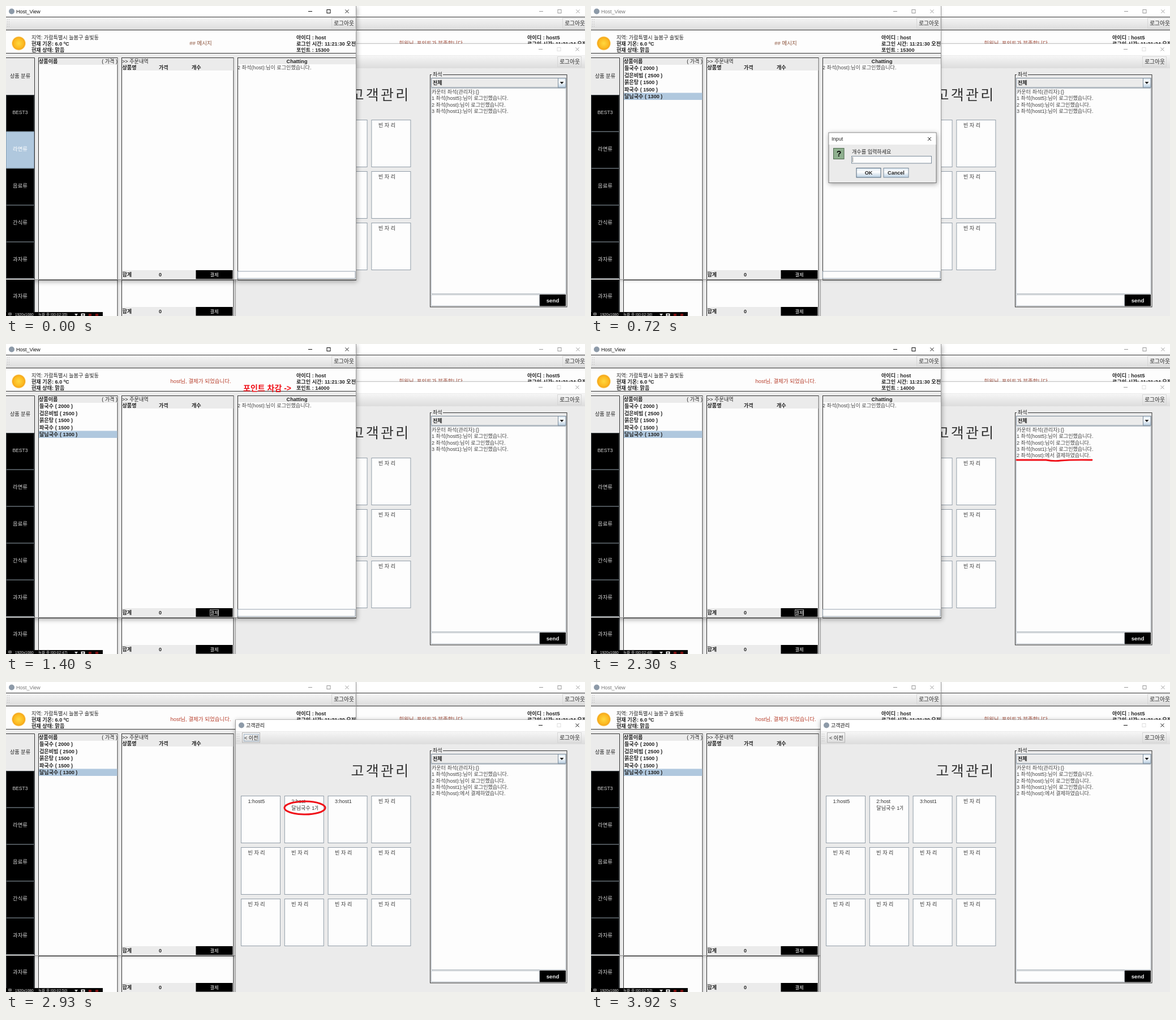
Recreate the animation shown at these times as an HTML page. Size 1023 px wide and 548 px high, loop 4.08 s.

```html
<!DOCTYPE html>
<html lang="ko">
<head>
<meta charset="utf-8">
<title>Order and payment demo</title>
<style>
html, body { margin: 0; width: 100%; height: 100%; overflow: hidden; background: #ebebeb; }
svg { display: block; width: 100vw; height: 100vh; }
text { font-family: "Liberation Sans", "Noto Sans CJK KR", "Noto Sans CJK", sans-serif; white-space: pre; }
.window { filter: drop-shadow(1px 2px 4px rgba(0, 0, 0, .35)); }
.inactive { filter: drop-shadow(0 1px 2px rgba(0, 0, 0, .2)); }
</style>
</head>
<body>
<svg viewBox="0 0 1023 548">
  <defs>
    <linearGradient id="bar" x2="0" y2="1"><stop stop-color="#f6f6f6"/><stop offset="1" stop-color="#dcdcdc"/></linearGradient>
    <linearGradient id="button" x2="0" y2="1"><stop stop-color="#dbe7f2"/><stop offset=".4" stop-color="#fff"/><stop offset="1" stop-color="#b9cfe2"/></linearGradient>
    <radialGradient id="sun"><stop stop-color="#ffd840"/><stop offset=".65" stop-color="#fbb820"/><stop offset=".82" stop-color="#f5a51c"/><stop offset=".88" stop-color="#fde6a8"/><stop offset="1" stop-color="#fff" stop-opacity="0"/></radialGradient>
  </defs>
  <g id="scene"></g>
</svg>
<script>
const LOOP = 4080;
const GRAY = '#ebebeb', DARK = '#333', EDGE = '#7a8a99', SOFT = '#b4bcc4', WHITE = '#fdfdfd', RED = '#f01018';
const MENU = ['BEST3', '라면류', '음료류', '간식류', '과자류', '과자류'];
const NOODLES = [['들국수', 2000], ['검은비빔', 2500], ['붉은탕', 1500], ['파국수', 1500], ['달님국수', 1300]];
const CHOICE = NOODLES[4];
// [time in ms, recorder seconds]
const TICKS = [[0, 35], [390, 36], [830, 39], [1000, 42], [1220, 46], [1280, 47],
  [1860, 48], [2430, 49], [2800, 50], [3390, 51], [3890, 52]];

const rect = (x, y, w, h, fill, stroke = 'none', extra = '') =>
  `<rect x="${x}" y="${y}" width="${w}" height="${h}" fill="${fill}" stroke="${stroke}" ${extra}/>`;
const path = (d, stroke = DARK, width = 1, extra = '') =>
  `<path d="${d}" fill="none" stroke="${stroke}" stroke-width="${width}" ${extra}/>`;
const escapeText = s => String(s).replace(/&/g, '&amp;').replace(/</g, '&lt;').replace(/>/g, '&gt;');
// y is the middle of the line
const text = (x, y, s, { size = 9.1, color = '#222', weight = 400, anchor = 'start', extra = '' } = {}) =>
  `<text x="${x}" y="${y + size * .36}" font-size="${size}" fill="${color}" font-weight="${weight}" text-anchor="${anchor}" ${extra}>${escapeText(s)}</text>`;
const bold = (x, y, s, options) => text(x, y, s, { weight: 700, ...options });
const centered = (x, y, s, options) => text(x, y, s, { anchor: 'middle', ...options });
const cross = (x, y, color) => path(`M${x - 3} ${y - 3}l6 6m0 -6l-6 6`, color);

function titleBar(x, y, w, title, active, maxColor) {
  const color = active ? '#111' : '#999', right = x + w, mid = y + 9.5;
  return rect(x, y, w, 20, '#fff') +
    `<circle cx="${x + 10}" cy="${mid}" r="5" fill="#8d9aa8"/>` +
    text(x + 18, mid, title, { size: 9, color: active ? '#111' : '#777' }) +
    path(`M${right - 85} ${mid}h7`, color) +
    rect(right - 52, mid - 3, 6, 6, 'none', maxColor || color) + cross(right - 16.5, mid, color);
}

function toolBar(x, y, w, logoutX) {
  let grip = '';
  for (let i = 0; i < 4; i++) grip += path(`M${x + 2} ${y + 4 + i * 4}h6`, '#aaa', 1, 'stroke-dasharray="1 2"');
  return rect(x, y, w, 22, 'url(#bar)') + grip +
    rect(logoutX - 21.5, y + 1.5, 42, 18, 'url(#bar)', '#d6d6d6') +
    centered(logoutX, y + 10.5, '로그아웃', { size: 9.7, weight: 500 });
}

function clientWindow(w, bottom, s) {
  let out = rect(0, 0, w, bottom, GRAY) + titleBar(0, 0, w, 'Host_View', s.active) +
    toolBar(0, 20, w, w - 22) + rect(0, 43, w, 40, WHITE) +
    path(`M0 19.5H${w}M0 42.5H${w}M0 83.5H${w}`, DARK) +
    '<circle cx="22.5" cy="66" r="13.5" fill="url(#sun)"/>' +
    bold(45, 56, '지역: 가람특별시 늘봄구 솔빛동', { weight: 500 }) +
    bold(45, 67, '현재 기온: 6.0 ºC') + bold(45, 78, '현재 상태: 맑음') +
    centered(w - 275, 66, s.message, { size: 9.5, color: s.messageColor }) +
    bold(w - 106, 56, '아이디 : ' + s.id) +
    bold(w - 106, 67, `로그인 시간: ${s.login} 오전`) + bold(w - 106, 78, '포인트 : ' + s.points);

  // category menu
  out += path(`M0 91.5H50.5V${bottom}`) + centered(25, 124, '상품 분류', { weight: 500 });
  for (let i = 0, y = 157; y + 60 < bottom; i++, y += 65) {
    const lit = i === s.lit;
    out += rect(0.5, y + .5, 49, 64, lit ? '#b0c8de' : '#000', lit ? '#8ba3b8' : '#4c5358') +
      centered(25, y + 31, MENU[i], { size: i ? 9.4 : 8.6, color: lit ? '#fff' : '#d0d0d0' });
  }

  // product list
  out += rect(57.5, 91.5, 139.5, bottom - 91, WHITE, DARK) + rect(58, 92, 138.5, 12, GRAY) +
    bold(58, 98, '상품이름') + bold(197, 98, '( 가격 )', { anchor: 'end', weight: 500 });
  if (s.selected) out += rect(58, 153.5, 138.5, 12.5, '#b0c8de');
  if (s.listed) NOODLES.forEach(([name, price], i) => out += bold(59, 110 + i * 12.5, `${name} ( ${price} )`));

  // order and total
  const total = bottom - 17;
  out += rect(204.5, 91.5, 197.5, bottom - 91, WHITE, DARK) + rect(205, 92, 196.5, 22, GRAY) +
    bold(205, 98, '>> 주문내역', { weight: 500 }) + rect(205, total, 196.5, 17, GRAY);
  const row = (y, cells) => cells.map((c, i) => bold([205.5, 270, 328][i], y, c)).join('');
  out += row(109, ['상품명', '가격', '개수']) + row(total + 8, ['합계', s.ordered ? CHOICE[1] : 0]);
  if (s.ordered) out += row(120, [CHOICE[0], CHOICE[1], 1]);
  out += rect(335.5, total, 65, 15.5, '#000') +
    centered(368, total + 8, '결제', { size: 8.2, color: '#eee' });
  if (s.payFocus) out += rect(360.5, total + 2.5, 15, 11, 'none', '#aaa');

  // chat
  out += rect(409.5, 91.5, w - 410, bottom - 91, WHITE, DARK) + rect(410, 92, w - 411, 11, GRAY) +
    centered(409 + (w - 409) / 2, 98, 'Chatting', { weight: 700 }) +
    text(409, 109, '2 좌석(host):님이 로그인했습니다.', { color: '#444' }) +
    rect(409.5, bottom - 15, w - 411.5, 12.5, WHITE, EDGE, 'stroke-width=".8"');
  return out + path(`M${w - .5} 0V${bottom - .5}H0`, '#999');
}

function adminWindow(s) {
  let out = rect(405.5, 67, 620, 490, GRAY, '#999') + titleBar(406, 67, 620, '고객관리', s.active, '#ddd') +
    toolBar(406, 88, 618, 996) + rect(417.5, 89.5, 31, 17.5, 'url(#bar)', '#b5b5b5') +
    text(421, 98.5, '< 이전', { weight: 500 }) +
    centered(662, 156.5, '고객관리', { size: 25, weight: 200, color: '#333', extra: 'letter-spacing="3.3"' });
  if (s.backFocus) out += rect(420.5, 92.5, 26, 12, 'none', '#9fb4c8');

  const seats = ['1:host5', '2:host', '3:host1'];
  for (let i = 0; i < 12; i++) {
    const x = 415.5 + i % 4 * 76.8, y = 201.5 + Math.floor(i / 4) * 91;
    out += rect(x, y, 69, 83, WHITE, '#929da8') + text(x + 12, y + 9.5, seats[i] || '빈 자 리', { color: '#333' });
    if (i === 1 && s.paid) out += text(x + 12, y + 21, CHOICE[0] + ' 1개', { color: '#333' }) + rect(551, y + 12, 9, 16, WHITE);
  }

  out += rect(749.5, 121.5, 241.5, 410.5, GRAY, DARK) + rect(752, 118, 20, 7, GRAY) + text(754, 121, '좌석', { weight: 500 }) +
    rect(751.5, 127.5, 237.5, 16.5, GRAY, EDGE) + bold(754, 136, '전체') +
    rect(975.5, 127.5, 13.5, 16.5, 'url(#button)', EDGE) + '<path d="M978.5 134h7l-3.5 4z" fill="#222"/>' +
    rect(751.5, 145.5, 237.5, 363, WHITE, SOFT) +
    rect(751.5, 510.5, 191, 19.5, WHITE, SOFT) + rect(943, 510, 46, 20.5, '#000') +
    centered(966, 521, 'send', { size: 9.7, weight: 700, color: '#eee' });
  const log = ['카운터 좌석(관리자):{}', '1 좌석(host5):님이 로그인했습니다.',
    '2 좌석(host):님이 로그인했습니다.', '3 좌석(host1):님이 로그인했습니다.'];
  if (s.paid) log.push('2 좌석(host):에서 결제하였습니다.');
  log.forEach((line, i) => out += text(752, 152 + i * 11.15, line, { color: '#444' }));
  return out;
}

function inputDialog(value) {
  const button = (x, w, label, edge) => rect(x, 286.5, w, 16.5, 'url(#button)', edge) +
    centered(x + w / 2, 295, label, { weight: 700 });
  return '<g class="window">' + rect(420, 224, 190, 88.5, GRAY, '#777') + rect(420.5, 224.5, 189, 20.5, '#fff') +
    text(425, 235, 'Input') + cross(598, 235, '#222') +
    rect(428.5, 251.5, 18.5, 19, '#8fb08f', '#4d694d') + centered(438, 261, '?', { size: 14, weight: 700, color: '#000' }) +
    bold(461, 258, '개수를 입력하세요', { weight: 500 }) + rect(460.5, 265.5, 141, 12.5, WHITE, EDGE) +
    text(463, 272, value) + path(`M${value ? 468.5 : 462.5} 267v9`, '#444', .7) +
    button(469, 43, 'OK', '#4f6478') + button(517, 44, 'Cancel', EDGE) + '</g>';
}

function recorder(seconds) {
  const small = { size: 6.6, color: '#ddd' };
  return rect(0, 541, 171, 7, '#050505') + rect(5, 543, 4, 3, 'none', '#ccc') +
    text(16, 545.5, '1920x1080', small) + text(57, 545.5, `녹화 중 [00:02:${seconds}]`, small) +
    '<path d="M121 544h6l-3 4z" fill="#ddd"/>' + rect(132.5, 543.5, 7, 4.5, '#eee') +
    '<circle cx="136" cy="546" r="1.3" fill="#111"/>' +
    rect(146, 544, 5, 4, '#7c1010') + rect(158, 544, 5, 4, '#7c1010');
}

// A pen stroke revealed from start to end in a few hard steps
function pen(d, t, start, end, steps, width) {
  const done = Math.min(1, (Math.floor((t - start) / (end - start) * steps + .001) + 1) / (steps + 1));
  return path(d, RED, width, `pathLength="100" stroke-linecap="round" stroke-dasharray="${done * 100} 200"`);
}

function scene(t) {
  const during = (from, to = LOOP) => t >= from && t < to;
  const adminOnTop = during(2330), paid = during(1280);
  const active = during(0, 720) || during(835, 2400);
  const back = clientWindow(1027, 549, {
    id: 'host5', login: '11:21:24', points: 0, message: '회원님, 포인트가 부족합니다.', messageColor: '#a04a38'
  });
  const front = `<g class="${active ? 'window' : 'inactive'}">` + clientWindow(619, 484, {
    id: 'host', login: '11:21:30', active,
    points: paid ? 14000 : 15300,
    message: paid ? 'host님, 결제가 되었습니다.' : '## 메시지',
    messageColor: paid ? '#b8402e' : '#8a5038',
    lit: during(0, 100) ? 1 : -1,
    listed: during(60), selected: during(200),
    ordered: during(890, 1280), payFocus: during(1220, 2400)
  }) + '</g>';
  const admin = `<g class="${during(2400) ? 'window' : 'inactive'}">` + adminWindow({
    active: during(2400), backFocus: during(2400, 3170), paid: during(1860)
  }) + '</g>';

  let out = back + (adminOnTop ? front + admin : admin + front);
  if (during(720, 835)) out += inputDialog(during(780) ? '1' : '');
  if (during(1340, 2300)) out += bold(419, 78, '포인트 차감 ->', { size: 14, color: RED });
  if (during(1900, 2800)) out += pen('M752 205L804 205Q818 207.5 830 206Q846 204.5 885 205', t, 1900, 2030, 3, 2.8);
  if (during(2800, 3390)) out += pen('M492 222A36 11.5 0 0 1 564 223A36 11.5 0 0 1 492 222', t, 2800, 2930, 4, 3);
  return out + recorder(TICKS.filter(([time]) => time <= t).pop()[1]);
}

const stage = document.getElementById('scene');
let shown = '';
function draw() {
  const next = scene(performance.now() % LOOP);
  if (next !== shown) stage.innerHTML = shown = next;
  requestAnimationFrame(draw);
}
draw();
</script>
</body>
</html>
```
